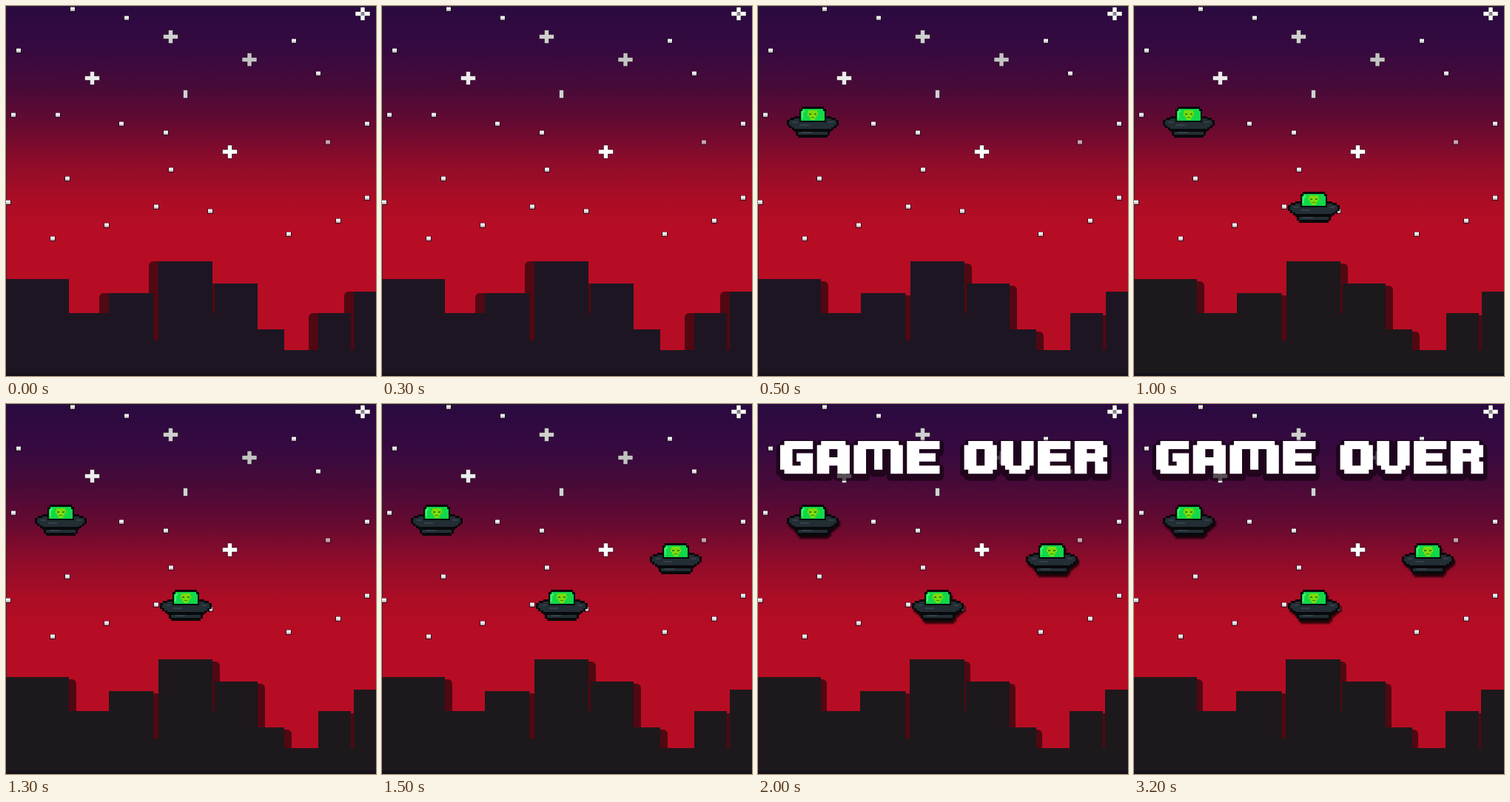
An HTML page that plays this animation: 500 px wide and 500 px high, repeating every 4000 ms.

```html
<!DOCTYPE html>
<html lang="en">
<head>
<meta charset="utf-8">
<title>Game over</title>
<style>
html, body { margin: 0; width: 100%; height: 100%; overflow: hidden; background: #1d1622; }
svg { display: block; width: 100vw; height: 100vh; }
.step { animation: 4s step-end infinite; }
.dusk { animation-name: dusk; }
.s1 { animation-name: s1; }
.s2 { animation-name: s2; }
.s3 { animation-name: s3; }
.end { animation-name: end; }
.play { animation-name: play; }
.nudge { animation-name: nudge; }
.city { animation-name: city; }
@keyframes dusk { 0% { opacity: 1 } 12.5%, to { opacity: 0 } }
@keyframes s1 { 0% { opacity: 0 } 12.5%, to { opacity: 1 } }
@keyframes s2 { 0% { opacity: 0 } 25%, to { opacity: 1 } }
@keyframes s3 { 0% { opacity: 0 } 37.5%, to { opacity: 1 } }
@keyframes end { 0% { opacity: 0 } 50%, to { opacity: 1 } }
@keyframes play { 0% { opacity: 1 } 50%, to { opacity: 0 } }
@keyframes nudge { 0% { transform: none } 50%, to { transform: translateX(-2px) } }
@keyframes city { 0% { fill: #1d1622 } 25%, to { fill: #1d181b } }
</style>
</head>
<body>
<svg viewBox="0 0 500 500" preserveAspectRatio="none">
  <defs>
    <linearGradient id="sky" x2="0" y2="1">
      <stop offset="0" stop-color="#2a0a40"/>
      <stop offset=".12" stop-color="#360a40"/>
      <stop offset=".22" stop-color="#480a38"/>
      <stop offset=".32" stop-color="#650a31"/>
      <stop offset=".42" stop-color="#8d0c2a"/>
      <stop offset=".52" stop-color="#ab0d25"/>
      <stop offset=".6" stop-color="#b60d24"/>
    </linearGradient>
    <filter id="soft" x="-20%" y="-20%" width="140%" height="150%"><feGaussianBlur stdDeviation="1.3"/></filter>

    <g id="dot">
      <path d="M-4-3H4V4H-4Z" fill="#1a0716" opacity=".7"/>
      <path d="M-3-2.5H3V2.5H-3Z" fill="#f4f4f4"/>
      <path d="M-3 .5H3V2.5H-3Z" fill="#c9c9c9"/>
    </g>
    <path id="plus" d="M-3-9H3V-3H10V3H3V9H-3V3H-10V-3H-3Z" stroke="#1a0716" stroke-opacity=".55"/>

    <path id="hull" d="M20 0H50V3H53V13H60V15H66V18H70V26H67V29H63V32H60V34H58V39H55V42H15V39H12V34H10V32H7V29H3V26H0V18H4V15H10V13H17V3H20Z"/>
    <g id="ufo">
      <use href="#hull" fill="#08090b"/>
      <path d="M21 3H49V6H51V19H19V6H21Z" fill="#12d84a"/>
      <path d="M21 5H24V8H22V16H20V6H21Z" fill="#3fef6c"/>
      <path d="M29 5H41V8H42V12H40V15H38V18H32V15H30V12H28V8H29Z" fill="#7cdc0a"/>
      <path d="M30 9H33V11H30ZM37 9H40V11H37ZM33 14H37V15H33Z" fill="#35850f"/>
      <path d="M10 16H17V21H53V16H60V18H66V20H67V25H64V28H60V30H10V28H6V25H3V20H4V18H10Z" fill="#232e34"/>
      <path d="M8 20H14V22H8ZM18 24H30V26H18ZM56 20H63V22H56Z" fill="#34414a"/>
      <path d="M15 34H55V38H15Z" fill="#232e34"/>
      <path d="M20 34H34V36H20Z" fill="#34414a"/>
    </g>

    <path id="skyline" d="M0 369H85V415H139V388H199.500V452H206V345H279V415H282V375H340V437H376V465H422V415H466V465H470V386H500V500H0Z"/>

    <g id="words" fill-rule="evenodd" transform="translate(30 50) scale(5.525)">
      <path d="M1 0H8V2H3V6H5V5H4V3H8V8H1V7H0V1H1Z"/>
      <path transform="translate(9)" d="M1 0H7V1H8V8H5V6H3V8H0V1H1ZM3 2H5V4H3Z"/>
      <path transform="translate(18)" d="M1 0H11V1H12V8H9V2H7V7H5V2H3V8H0V1H1Z"/>
      <path id="e" transform="translate(31)" d="M0 0H8V2H3V3H7V5H3V6H8V8H0Z"/>
      <path transform="translate(45)" d="M1 0H7V1H8V7H7V8H1V7H0V1H1ZM3 2H5V6H3Z"/>
      <path transform="translate(54)" d="M0 0H3V6H5V0H8V6H7V7H6V8H2V7H1V6H0Z"/>
      <use href="#e" x="32"/>
      <path transform="translate(72)" d="M0 0H7V1H8V4H7V5H8V8H5V5H3V8H0ZM3 2H5V3H3Z"/>
    </g>
  </defs>

  <rect width="500" height="500" fill="url(#sky)"/>
  <path class="step play" d="M.5 369V.5H500" fill="none" stroke="#26222c" stroke-opacity=".7"/>

  <g id="stars">
    <use href="#plus" x="222.500" y="41.500" fill="#cfcfcf"/>
    <use href="#plus" x="116.500" y="97.500" fill="#ececec"/>
    <use href="#plus" x="329" y="72.500" fill="#c2c2c2"/>
    <use href="#plus" x="302.500" y="197" fill="#fff"/>
    <use href="#plus" x="482" y="10.500" fill="#fff"/>
    <rect x="479.500" y="8" width="5" height="5" fill="#8d8790"/>
    <rect x="239.500" y="113.500" width="6" height="11" fill="#d2d2d2" stroke="#1a0716" stroke-opacity=".55"/>
  </g>

  <g fill="#510812">
    <g class="step dusk">
      <rect x="126" y="388" width="30" height="50" rx="6"/>
      <rect x="193" y="345" width="30" height="115" rx="6"/>
      <rect x="268" y="375" width="20" height="50" rx="6"/>
      <rect x="409" y="415" width="30" height="65" rx="6"/>
      <rect x="457" y="386" width="30" height="95" rx="6"/>
    </g>
    <g class="step s1"><g class="step nudge">
      <rect x="65" y="372" width="30" height="60" rx="6"/>
      <rect x="180" y="391" width="30" height="70" rx="6"/>
      <rect x="259" y="348" width="30" height="75" rx="6"/>
      <rect x="320" y="378" width="30" height="75" rx="6"/>
      <rect x="356" y="440" width="30" height="40" rx="6"/>
      <rect x="446" y="418" width="30" height="60" rx="6"/>
    </g></g>
  </g>

  <g class="step city">
    <use href="#skyline"/>
    <use class="step end" href="#skyline" x="-1"/>
  </g>
  <rect y="496" width="500" height="4" fill="#17121a"/>

  <g class="step end">
    <g filter="url(#soft)" opacity=".75">
      <use href="#hull" x="41" y="140"/>
      <use href="#hull" x="210" y="255"/>
      <use href="#hull" x="364" y="192"/>
    </g>
  </g>
  <use class="step s1" href="#ufo" x="39" y="136"/>
  <use class="step s2" href="#ufo" x="208" y="251"/>
  <use class="step s3" href="#ufo" x="362" y="188"/>

  <g class="step end" role="img" aria-label="GAME OVER">
    <g opacity=".68" fill="#12040f" stroke="#12040f" stroke-width="2" stroke-linejoin="round">
      <use href="#words" y="4"/>
    </g>
    <use href="#words" fill="#fff"/>
  </g>
</svg>
<script>
const dots = [
  [90, 4], [163, 16], [17, 60], [389, 47], [422, 91], [10, 147], [70, 147],
  [156, 159], [216, 171], [488, 159], [435, 184], [223, 221], [83, 233],
  [3, 265], [203, 271], [276, 277], [136, 296], [63, 314], [382, 308],
  [449, 290], [488, 259]
];
const stars = document.getElementById('stars');
for (const [x, y] of dots) {
  const dot = document.createElementNS(stars.namespaceURI, 'use');
  dot.setAttribute('href', '#dot');
  dot.setAttribute('x', x);
  dot.setAttribute('y', y);
  if (x === 435) dot.setAttribute('opacity', .7);
  stars.append(dot);
}
</script>
</body>
</html>
```
